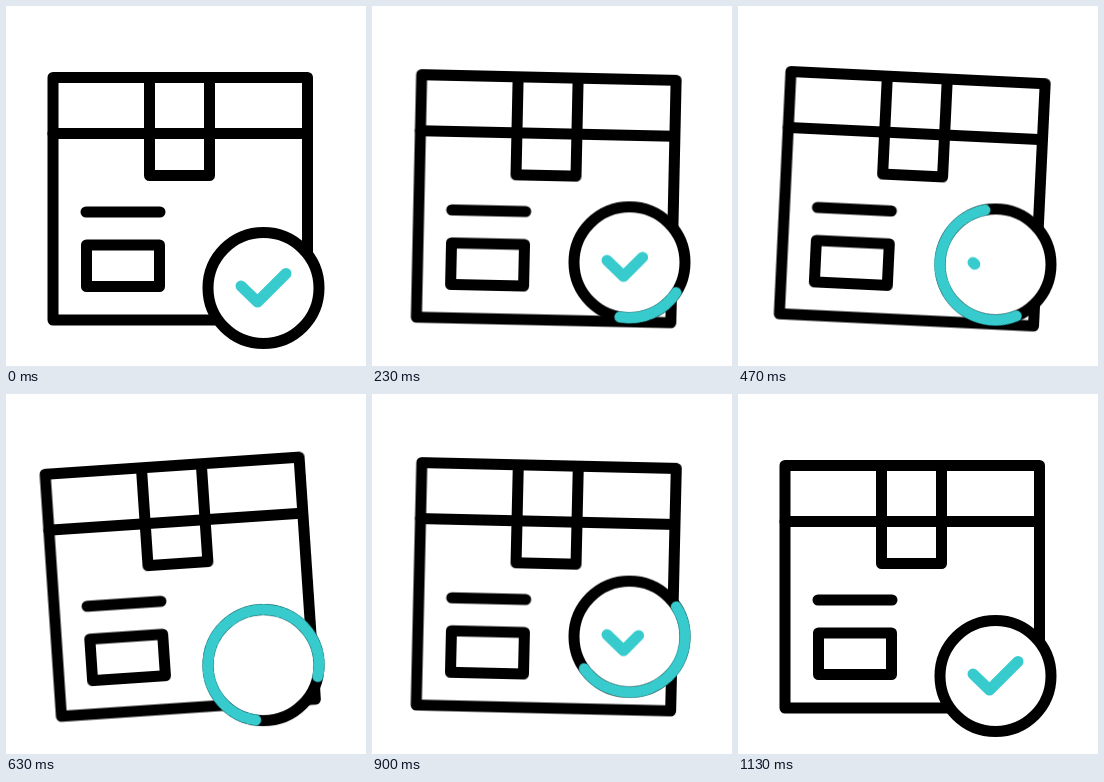
Recreate the animation shown at these times as an HTML page without scripts. Size 360 by 360 pixels, loop 1670 ms.

```html
<!DOCTYPE html>
<html lang="en">
<head>
<meta charset="utf-8">
<title>Parcel confirmed</title>
<style>
  html, body { margin: 0; width: 100%; height: 100%; overflow: hidden; background: #fff; }
  svg { display: block; width: 100vw; height: 100vh; }
  svg * { stroke-width: 11; stroke-linecap: round; stroke-linejoin: round; }
  .ink { fill: none; stroke: #000; }
  .teal { fill: none; stroke: #38cbcd; }
  .disc { fill: #fff; stroke: #000; }

  /* 50 ticks per loop, so one tick is 2%; steps(n) spans n ticks */
  .box, .badge, .arc, .tick { animation: 1670ms step-end -6ms infinite; }
  .box { animation-name: sway; transform-origin: 174.25px 192.75px; }
  .badge { animation-name: hop; }
  .arc { animation-name: spin, sweep, show; transform-origin: 257.5px 282px; }
  .tick { animation-name: draw; stroke-dasharray: 100 300; }

  @keyframes sway {
    0% { transform: rotate(0deg); }
    4% { transform: rotate(0deg); animation-timing-function: steps(5); }
    14% { transform: rotate(1.25deg); animation-timing-function: steps(6); }
    26% { transform: rotate(5deg); animation-timing-function: steps(1); }
    28% { transform: rotate(2.75deg); animation-timing-function: steps(4); }
    36% { transform: rotate(-5deg); animation-timing-function: steps(6); }
    48% { transform: rotate(1.9deg); animation-timing-function: steps(10); }
    68%, 100% { transform: rotate(0deg); }
  }
  @keyframes hop {
    0% { transform: translateY(0); }
    4% { transform: translateY(0); animation-timing-function: steps(8); }
    20% { transform: translateY(-41px); animation-timing-function: steps(8); }
    36% { transform: translateY(-6px); animation-timing-function: steps(8); }
    52% { transform: translateY(-45px); animation-timing-function: steps(8); }
    68%, 100% { transform: translateY(0); }
  }
  @keyframes spin {
    0% { transform: rotate(13deg); }
    6% { transform: rotate(13deg); animation-timing-function: steps(4); }
    14% { transform: rotate(33deg); animation-timing-function: steps(7); }
    28% { transform: rotate(68deg); animation-timing-function: steps(5); }
    38% { transform: rotate(98deg); animation-timing-function: steps(4); }
    46% { transform: rotate(209.5deg); animation-timing-function: steps(4); }
    54% { transform: rotate(327.5deg); animation-timing-function: steps(7); }
    68%, 100% { transform: rotate(545deg); }
  }
  @keyframes sweep {
    0% { stroke-dasharray: 0 360; }
    6% { stroke-dasharray: 0 360; animation-timing-function: steps(4); }
    14% { stroke-dasharray: 67 360; animation-timing-function: steps(7); }
    28% { stroke-dasharray: 191 360; animation-timing-function: steps(5); }
    38% { stroke-dasharray: 274 360; animation-timing-function: steps(4); }
    46% { stroke-dasharray: 250 360; animation-timing-function: steps(4); }
    54% { stroke-dasharray: 177 360; animation-timing-function: steps(7); }
    68%, 100% { stroke-dasharray: 0 360; }
  }
  @keyframes show {
    0% { opacity: 0; }
    8% { opacity: 1; }
    68%, 100% { opacity: 0; }
  }
  @keyframes draw {
    0% { stroke-dashoffset: 0; }
    6% { stroke-dashoffset: 0; animation-timing-function: steps(2); }
    10% { stroke-dashoffset: 5; animation-timing-function: steps(2); }
    14% { stroke-dashoffset: 21; animation-timing-function: steps(5); }
    24% { stroke-dashoffset: 79; animation-timing-function: steps(2); }
    28% { stroke-dashoffset: 96; animation-timing-function: steps(2); }
    32% { stroke-dashoffset: 102; }
    38% { stroke-dashoffset: 102; animation-timing-function: steps(2); }
    42% { stroke-dashoffset: 93; animation-timing-function: steps(2); }
    46% { stroke-dashoffset: 75; animation-timing-function: steps(4); }
    54% { stroke-dashoffset: 30; animation-timing-function: steps(2); }
    58% { stroke-dashoffset: 10; animation-timing-function: steps(3); }
    64%, 100% { stroke-dashoffset: 0; }
  }
</style>
</head>
<body>
<svg viewBox="0 0 360 360">
  <g class="box ink">
    <path d="M47 71.5H301.5V314H47Z"/>
    <path d="M47 127.5H301.5"/>
    <path d="M143.5 71.5V169.5H203.5V71.5"/>
    <path d="M80 206H154"/>
    <path d="M80.5 239H153.5V280.5H80.5Z"/>
  </g>
  <g class="badge">
    <circle class="disc" cx="257.5" cy="282" r="55.5"/>
    <circle class="arc teal" cx="257.5" cy="282" r="55.5" pathLength="360"/>
    <path class="tick teal" d="M235 280L251.5 296L280 267.5" pathLength="100"/>
  </g>
</svg>
</body>
</html>
```
